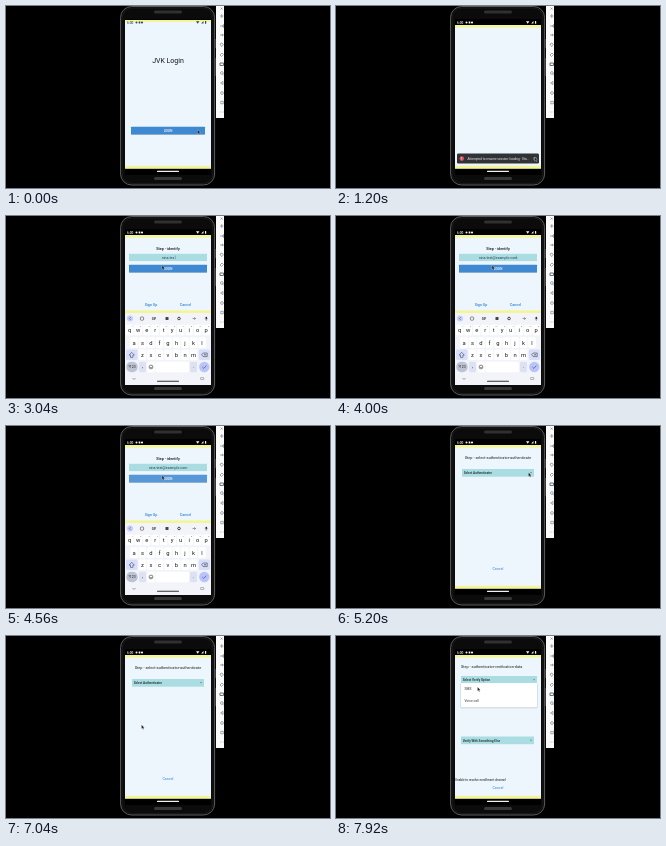
Animation of 324 by 182 pixels, one loop 8000 ms. Source, as an HTML page:

```html
<!DOCTYPE html>
<html lang="en">
<head>
<meta charset="utf-8">
<title>Login flow</title>
<style>
html, body { margin: 0; width: 100%; height: 100%; overflow: hidden; background: #000; }
svg { display: block; width: 100vw; height: 100vh; font-family: Roboto, "Noto Sans", sans-serif; }
</style>
</head>
<body>
<svg id="stage" viewBox="0 0 324 182"></svg>
<script>
const LOOP = 8000, STEP = 80;
const TEAL = '#aadde2', BLUE = '#3f88d2', LINK = '#2d83d8', PAGE = '#edf5fd', YELLOW = '#f4f695';
const EMAIL = 'nina.test@example.com';
const stage = document.getElementById('stage');

const clamp = v => Math.max(0, Math.min(1, v));
const ramp = (t, a, b) => clamp((t - a) / (b - a));
const ease = v => v * v * (3 - 2 * v);

const rect = (x, y, w, h, fill, r = 0, more = '') =>
  `<rect x="${x}" y="${y}" width="${w}" height="${h}" fill="${fill}" rx="${r}" ${more}/>`;
const circle = (x, y, r, fill, more = '') =>
  `<circle cx="${x}" cy="${y}" r="${r}" fill="${fill}" ${more}/>`;
const path = (d, color, width = .5) =>
  `<path d="${d}" fill="none" stroke="${color}" stroke-width="${width}"/>`;
const group = (body, opacity = 1, dy = 0) =>
  `<g opacity="${opacity}" transform="translate(0 ${dy})">${body}</g>`;
// y is the vertical middle of the lowercase-and-capital band
const text = (s, x, y, size, fill = '#222', anchor = 'middle', weight = 400) =>
  `<text x="${x}" y="${y + size * .36}" font-size="${size}" fill="${fill}" text-anchor="${anchor}" font-weight="${weight}">${s}</text>`;

function phone() {
  return rect(114.6, .5, 94, 178.5, '#0b0b0b', 11, 'stroke="#5c5c5c" stroke-width="1"') +
    rect(116.2, 2, 90.8, 175.5, 'none', 10, 'stroke="#222" stroke-width=".6"') +
    rect(148, 4.5, 28, 3, '#303030', 1.5) + rect(148, 171, 28, 3, '#383838', 1.5) +
    rect(208.7, 33, .9, 9, '#555') + rect(208.7, 52, .9, 18, '#555');
}

function toolbar() {
  let out = rect(210, 0, 8, 112, '#fafafa');
  const marks = ['M214.6 1.6l2 2m0-2l-2 2', 'M214 10h3.5m-1.7-2v4', 'M214 20h2l1.5-1.5v3l-1.5-1.5',
    'M214 29h1.5l1.5-1v2l-1.5-1', 'M214 38l2-1 1.5 2-2 1.5z', 'M214 49l2-2 1.5 1.5-2 2z',
    'M214 57h3.5v2.5h-3.5z', 'M214.5 67a1.3 1.3 0 1 0 2.8 0a1.3 1.3 0 1 0-2.8 0m2 1l1.2 1',
    'M217 75.4l-2.5 1.6 2.5 1.6z', 'M214.6 87a1.4 1.4 0 1 0 2.8 0a1.4 1.4 0 1 0-2.8 0',
    'M214.8 95.3h2.5v2.5h-2.5z', 'M214.2 106h.6m.8 0h.6m.8 0h.6'];
  marks.forEach((d, i) => out += path(d, '#65727a', i === 6 ? 1 : .6));
  return out;
}

function statusBar(light) {
  const ink = light ? '#3b454c' : '#f4f4f4';
  return text('6:00', 121, 16.5, 3.2, ink, 'start', 500) + circle(130.5, 16.5, 1, ink) +
    rect(132.7, 15.5, 1.6, 2, ink) + circle(136, 16.5, 1.1, ink) +
    `<path d="M190 15.2h3.4l-1.7 2.5zM197.5 15v2.6h-2.3z" fill="${ink}"/>` +
    rect(199, 15, 1.2, 2.7, ink, .3);
}

function shell(light) {
  const top = light ? 14 : 19;
  return rect(119, 13, 86, 156, '#000') + rect(119, top, 86, 163 - top, PAGE) +
    rect(119, top, 86, light ? 2 : 2.6, YELLOW) + rect(119, 159.8, 86, 3, YELLOW) +
    rect(119, 162.8, 86, 6.2, '#000') + statusBar(light) + rect(151, 164.8, 22, 1.1, '#f2f2f2', .5);
}

const button = (x, y, w, press) =>
  rect(x, y + .5, w, 7.5, '#8fa5ba', .5) + rect(x, y, w, 7.5, BLUE, .5) +
  rect(x, y, w, 7.5, '#fff', .5, `opacity="${press * .25}"`) +
  text('LOGIN', x + w / 2, y + 3.7, 3, '#fff', 'middle', 500);

const dropdown = (label, x, y, w) =>
  rect(x, y, w, 7.7, TEAL) + text(label, x + 1.7, y + 4, 3.1, '#172326', 'start', 500) +
  `<path d="M${x + w - 4} ${y + 3.3}h2l-1 1.2z" fill="#59777b"/>`;

function menu(items, x, y, w, open) {
  const h = items.length * 12.2;
  return group(rect(x - .4, y + .2, w + .8, h + .7, '#b9c4cc', .8) + rect(x, y, w, h, '#fff', .6) +
    items.map((s, i) => text(s, x + 3.6, y + 6 + i * 12.3, 3.3, '#333', 'start')).join(''), open);
}

const pulse = (t, a, b) => Math.sin(Math.PI * ramp(t, a, b));

function welcome(t) {
  return text('JVK Login', 162, 54.8, 7, '#15181a') + button(125, 120.8, 74, pulse(t, 320, 720));
}

function toast(t) {
  const show = ramp(t, 800, 960) * (1 - ramp(t, 1360, 1520));
  return group(rect(121, 147.6, 82, 10, '#303236', 1.4) + circle(125.8, 152.6, 2.3, '#d95463') +
    text('!', 125.8, 152.6, 3.2, '#fff', 'middle', 700) +
    text('Attempted to resume session: loading - Sta...', 131.5, 152.7, 3.1, '#f3f3f3', 'start') +
    circle(199, 152.6, 1.9, '#696c70') + path('M198.3 151.9l1.4 1.4m0-1.4l-1.4 1.4', '#ddd', .4), show);
}

function identify(t) {
  const count = Math.round(EMAIL.length * ramp(t, 2560, 3760));
  const caret = t > 2000 && t < 4560 && t % 1000 < 500;
  return text('Step - identify', 162, 32.3, 3.8, '#111', 'middle', 500) +
    rect(123, 37.8, 78, 7.3, TEAL) +
    text(count ? EMAIL.slice(0, count) : 'Username', 162, 41.4, 3.6, count ? '#263a40' : '#638489') +
    (caret ? rect(162 + count * .87, 39.5, .4, 3.8, '#3d7980') : '') +
    button(123, 48.8, 78, pulse(t, 4160, 4640)) +
    text('Sign Up', 145, 88.5, 3.7, LINK, 'middle', 500) + text('Cancel', 179.5, 88.5, 3.7, LINK, 'middle', 500);
}

function keyboard(t) {
  const shown = ease(ramp(t, 1920, 2120)) * (1 - ease(ramp(t, 4720, 4960)));
  if (!shown) return '';
  const upper = t < 2600;
  let out = rect(119, 94.4, 86, 2.6, YELLOW) + rect(119, 97, 86, 72, '#f3f4fa');
  out += circle(124, 102.5, 3, '#c4cefb') + path('M124.8 101l-1.5 1.5 1.5 1.5', '#3e4860') +
    rect(134.4, 101, 3.2, 3.2, 'none', .8, 'stroke="#444" stroke-width=".6"') +
    text('GIF', 148, 102.5, 3, '#333', 'middle', 700) +
    rect(159.5, 101, 3, 3, '#444', .5) + circle(173, 102.5, 1.3, 'none', 'stroke="#333" stroke-width=".9"') +
    path('M186.5 102.5h3m-1.3-1.3l1.3 1.3-1.3 1.3', '#444') +
    rect(199.5, 100.7, 1.6, 2.4, '#222', .8) + path('M198.8 102.5q1.5 2.6 3 0m-1.5 1.2v1', '#222', .4);
  const rows = ['qwertyuiop', 'asdfghjkl', 'zxcvbnm'];
  rows.forEach((row, r) => {
    const first = [123.7, 128, 136.5][r], y = [114, 126.6, 138.8][r];
    [...row].forEach((c, i) => {
      const x = first + i * 8.5;
      out += rect(x - 3.8, y - 5.3, 7.6, 10.6, '#fff', 1.1) +
        text(upper ? c.toUpperCase() : c, x, y + .2, 5.8, '#16181c');
      if (!r) out += text((i + 1) % 10, x + 2.5, y - 3.4, 2.2, '#555');
    });
  });
  out += rect(120, 133.6, 11.5, 10.4, '#d8dffb', 1.4) +
    `<path d="M125.7 136.3l2.6 2.8h-1.4v2.3h-2.4v-2.3h-1.4z" fill="${upper ? '#222b45' : 'none'}" stroke="#222b45" stroke-width=".5"/>` +
    rect(192.8, 133.6, 11.2, 10.4, '#d8dffb', 1.4) + path('M195.6 138.8l1.6-1.8h4v3.6h-4zM198.2 137.9l1.7 1.7m0-1.7l-1.7 1.7', '#222') +
    rect(120.3, 145.8, 11.4, 10.4, '#bcc4d4', 5) + text('?123', 126, 151, 3.5, '#222') +
    rect(133, 145.8, 7, 10.4, '#dce2f1', 1.1) + text(',', 136.5, 150.3, 5) +
    rect(141.4, 145.8, 7.2, 10.4, '#fff', 1.1) +
    circle(145, 151, 1.9, 'none', 'stroke="#333" stroke-width=".6"') + path('M143.9 151.2q1.1 1.2 2.2 0', '#333', .5) +
    rect(149.5, 145.8, 33.3, 10.4, '#fff', 1.1) +
    rect(184, 145.8, 7, 10.4, '#dce2f1', 1.1) + text('.', 187.5, 150.3, 5) +
    circle(198.3, 151, 5.2, '#b9c5fa') + path('M196.4 151l1.4 1.4 2.6-2.8', '#33406a', .6) +
    path('M126.5 162l1.5 1.5 1.5-1.5', '#444', .5) + rect(151, 164.8, 22, 1, '#333', .5) +
    rect(194.6, 161.5, 3.2, 2, 'none', .3, 'stroke="#555" stroke-width=".4"');
  return group(out, 1, (1 - shown) * 75);
}

function choose(t) {
  const open = ramp(t, 5720, 5880) * (1 - ramp(t, 6880, 7040));
  return text('Step - select-authenticator-authenticate', 162, 32, 3.8, '#15181a') +
    dropdown('Select Authenticator', 126, 43, 72) + text('Cancel', 162, 142.5, 3.6, LINK) +
    (open ? menu(['Email', 'Password', 'Security Question', 'Phone'], 126, 47, 74, open) : '');
}

function verify(t) {
  const open = ramp(t, 7680, 7760);
  return text('Step - authenticator-verification-data', 125, 31, 3.8, '#15181a', 'start') +
    dropdown('Select Verify Option', 125, 40, 76) +
    dropdown('Verify With Something Else', 125, 100.5, 73) +
    text('Unable to resolve enrollment channel', 119, 143.8, 3.1, '#111', 'start') +
    text('Cancel', 162, 151.5, 3.6, LINK) +
    (open ? menu(['SMS', 'Voice call'], 125, 47, 76, open) : '');
}

// time, x, y of the pointer tip
const TRAIL = [[0, 191.5, 123.8], [720, 191.5, 123.8], [1120, 198.5, 151], [1360, 198.5, 151],
  [1520, 183, 138], [1760, 160.5, 42], [2720, 160.5, 42], [2880, 156, 49.5], [4640, 156, 49.5],
  [4960, 170, 48], [5200, 192.5, 46.5], [5760, 192.5, 46.5], [6480, 135.5, 88.8], [7360, 135.5, 88.8],
  [7600, 148, 44], [7760, 148, 44], [7920, 141.5, 51], [8000, 141.5, 51]];

function pointer(t) {
  const i = Math.max(1, TRAIL.findIndex(p => p[0] > t));
  const [a, b] = [TRAIL[i - 1], TRAIL[i]];
  const k = ease(ramp(t, a[0], b[0]));
  const x = a[1] + (b[1] - a[1]) * k, y = a[2] + (b[2] - a[2]) * k;
  return `<path transform="translate(${x} ${y})" d="M0 0v4l.9-.8.7 1.5.8-.4-.7-1.4h1.2z" fill="#111" stroke="#eee" stroke-width=".3"/>`;
}

function page(t) {
  if (t < 720) return welcome(t);
  if (t < 1440) return toast(t);
  if (t < 5040) return identify(t) + toast(t);
  return t < 7360 ? choose(t) : verify(t);
}

function draw(now) {
  const t = Math.floor(now % LOOP / STEP) * STEP;
  stage.innerHTML = `<defs><clipPath id="screen">${rect(119, 13, 86, 156, '#fff')}</clipPath></defs>` +
    rect(0, 0, 324, 182, '#000') + phone() + toolbar() +
    `<g clip-path="url(#screen)">${shell(t < 720)}${page(t)}${keyboard(t)}</g>` + pointer(t);
}

const start = performance.now();
function tick() {
  draw(performance.now() - start);
  requestAnimationFrame(tick);
}
tick();
</script>
</body>
</html>
```
